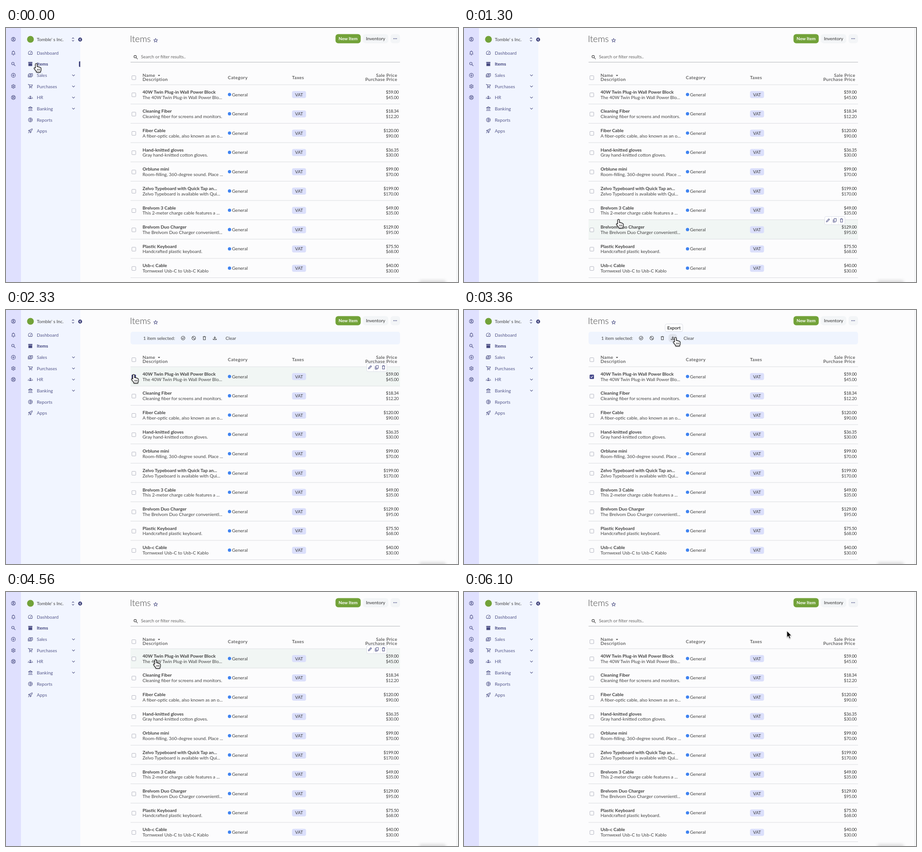
Write an HTML page that moves like this. It is 998x561 px and loops after 6.2 s.

```html
<!DOCTYPE html>
<html lang="en">
<head>
<meta charset="utf-8">
<title>Items</title>
<style>
html, body { margin: 0; width: 100%; height: 100%; overflow: hidden; background: #fcfcfd; }
svg { display: block; width: 998px; height: 561px; }
text { font: 400 10.1px Lato, sans-serif; fill: #424242; }
.b { font-weight: 700; }
.m { font-weight: 500; }
.h { letter-spacing: .4px; font-weight: 500; }
.nav { fill: #55588b; }
.price { font-size: 9.6px; letter-spacing: -.3px; text-anchor: end; }
.mid { text-anchor: middle; }
.icon { fill: none; stroke: #55588b; stroke-width: 1.1; stroke-linecap: round; stroke-linejoin: round; }
.dark { stroke: #424242; }
.box { fill: #fff; stroke: #dcdfe8; }
.cursor { filter: drop-shadow(0 1px 1px rgba(0, 0, 0, .35)); }
</style>
</head>
<body>
<svg id="stage" viewBox="0 0 998 561"></svg>
<script>
const LOOP = 6200;
const HOVER_LAG = 45;
const ROW_TOP = 125.3, ROW_H = 42.62;
const stage = document.getElementById('stage');

function add(tag, attrs, parent = stage) {
  const node = document.createElementNS('http://www.w3.org/2000/svg', tag);
  for (const key in attrs) node.setAttribute(key, attrs[key]);
  return parent.appendChild(node);
}
const rect = (x, y, width, height, fill, rx = 0, parent) =>
  add('rect', { x, y, width, height, fill, rx }, parent);
const circle = (cx, cy, r, fill, parent) => add('circle', { cx, cy, r, fill }, parent);
const group = (parent, cls = '') => add('g', { class: cls }, parent);
function text(str, x, y, cls = '', parent) {
  const node = add('text', { x, y, class: cls }, parent);
  node.textContent = str;
  return node;
}
const icon = (name, x, y, parent, cls = '') =>
  add('path', { d: ICONS[name] || name, transform: `translate(${x} ${y})`, class: 'icon ' + cls }, parent);
const show = (node, on) => node.setAttribute('visibility', on ? 'visible' : 'hidden');

const ring = r => `M${-r} 0a${r} ${r} 0 1 0 ${2 * r} 0a${r} ${r} 0 1 0 ${-2 * r} 0`;
const ICONS = {
  user: ring(4.4) + 'M-1.6-1.2a1.6 1.6 0 1 0 3.2 0a1.6 1.6 0 1 0-3.2 0M-3 3q3-2.4 6 0',
  bell: 'M-3.8 2.8H3.8M-2.8 2.8V-.8a2.8 2.8 0 0 1 5.6 0V2.8M0-4.6v.8M-.8 4.6h1.6',
  search: 'M-3.8-1a2.7 2.7 0 1 0 5.4 0a2.7 2.7 0 1 0-5.4 0M1 1L4 4',
  plus: ring(4.4) + 'M-2.2 0h4.4M0-2.2v4.4',
  gear: ring(3.5) + ring(1.3) + 'M0-3.5v-1.1M0 3.5v1.1M-3.1-1.8l-.9-.5M3.1 1.8l.9.5M-3.1 1.8l-.9.5M3.1-1.8l.9-.5',
  help: ring(4.4) + ring(1.7) + 'M-3.1-3.1l1.9 1.9M3.1-3.1l-1.9 1.9M-3.1 3.1l1.9-1.9M3.1 3.1l-1.9-1.9',
  dash: 'M-3.4 3.4a4.5 4.5 0 1 1 6.8 0zM0 1l2-2.8',
  items: 'M-4.2-4.2h8.4v2h-8.4zM-3.8-1h7.6v5.2h-7.6z',
  sales: 'M-3-3.6h7.8v5.4H-3zM-4.8-1.8v5.4h7.6M-.3-.9a1.2 1.2 0 1 0 2.4 0a1.2 1.2 0 1 0-2.4 0',
  cart: 'M-4.8-4.4h1.6l2 4.8h4l2-3.6h-7M-1.2.4l-1.2 1.8h6M-2 4.2h.2M3 4.2h.2',
  people: 'M-1.3-1.8a1.3 1.3 0 1 0 2.6 0a1.3 1.3 0 1 0-2.6 0M-2.6 2.4q2.6-2.6 5.2 0zM-4.2-.8h.2M4-.8h.2M-5 2.2q.3-1.4 1.4-1.4M5 2.2q-.3-1.4-1.4-1.4',
  bank: 'M-4.4-1.6L0-4.2l4.4 2.6zM-2.8 0v2.6M0 0v2.6M2.8 0v2.6M-4.4 4.3h8.8',
  chart: ring(4.3) + ring(1.5) + 'M0-4.3v2.8M0 1.5v2.8M1.5 0h2.8',
  rocket: 'M-2 .4Q0-4 4.4-4.4Q4 0-.4 2zM-2 .4l-2.4-.3l2-2.2M-.4 2l.3 2.4l2.2-2M-4.4 4.4l1.8-1.8M1-1.2h.3',
  chevron: 'M-2.6-1.2L0 1.3L2.6-1.2',
  left: 'M.8-1.6L-.9 0L.8 1.6',
  tick: 'M-2.3.1l1.6 1.7l3-3.4',
  sort: 'M-1.9-1.9L0-3.8L1.9-1.9M-1.9 1.9L0 3.8L1.9 1.9',
  star: 'M0-4.3L1.2-1.4L4.3-1.2L1.9.8L2.7 3.8L0 2.1L-2.7 3.8L-1.9.8L-4.3-1.2L-1.2-1.4z',
  enable: ring(4) + 'M-1.8 0l1.3 1.4l2.4-2.5',
  disable: ring(4) + 'M-2.8-2.8l5.6 5.6',
  trash: 'M-3-3h6M-1-3.8h2M-2.3-3v6.8h4.6V-3',
  export: 'M0-3.6V1M-1.9-.8L0 1.1L1.9-.8M-3.6 1.8v1.6h7.2V1.8',
  pencil: 'M-3.4 3.4l.4-2L2-3.6l1.6 1.6l-5 5z',
  copy: 'M-1.4-3.8h5v5.8h-5zM-3.4-2v6h5'
};

// Page frame and side panels
rect(0, 0, 998, 561, '#fcfcfd');
rect(0, 0, 33, 561, '#dfe0fe');
rect(33, 0, 131, 561, '#f1f5ff');
rect(995, 0, 1, 561, '#e6e7ea');
rect(913, 557, 58, 12, 'rgba(0, 0, 0, .12)', 4).style.filter = 'blur(3px)';

[['user', 25], ['bell', 55], ['search', 79.5], ['plus', 104.5], ['gear', 129], ['help', 153.5]]
  .forEach(([name, y]) => icon(name, 16.3, y));

circle(54, 25, 7.5, '#72a239');
text("Tomble' s Inc.", 68, 28.8);
icon('sort', 148, 25.3);
circle(163.7, 25.5, 4.4, '#45487f');
icon('left', 163.7, 25.5).style.stroke = '#fff';

[['dash', 'Dashboard', 55], ['items', 'Items', 79.5], ['sales', 'Sales', 104.5, 1],
 ['cart', 'Purchases', 129, 1], ['people', 'HR', 153.5, 1], ['bank', 'Banking', 178, 1],
 ['chart', 'Reports', 203], ['rocket', 'Apps', 227.2]].forEach(([name, label, y, more]) => {
  const mark = icon(name, 53.8, y);
  const caption = text(label, 68, y + 3.8, 'nav');
  if (more) icon('chevron', 149, y);
  if (label === 'Items') {
    mark.style.fill = '#45487f';
    mark.style.strokeWidth = .6;
    caption.style.cssText = 'fill:#3d407a;font-weight:700';
  }
});
const navMark = add('path', { d: 'M164 73.5h-1.2q-1.8 0-1.8 2v8.5q0 2 1.8 2h1.2z', fill: '#45487f' });

// Title and buttons
text('Items', 273.5, 31).style.cssText = 'font-size:19.8px;font-weight:300';
icon('star', 330.4, 27.3);
rect(727.5, 13.5, 55.7, 20.3, '#72a239', 6);
text('New Item', 755.3, 27.2, 'b mid').style.cssText = 'fill:#fff;font-size:9.7px';
rect(788, 13.5, 56, 20.3, '#f3f5f7', 6);
text('Inventory', 816, 27.2, 'm mid');
rect(849, 13.5, 21, 20.3, '#f3f5f7', 6);
[-3, 0, 3].forEach(d => circle(859.2 + d, 23.5, 1, '#55588b'));

// Search line and the bar that replaces it
const search = group();
icon('search', 286.3, 64.3, search, 'dark');
text('Search or filter results..', 298, 67.3, '', search).style.cssText = 'fill:#666;font-size:9.9px';
rect(275, 75, 595, 1, '#b4b6bb', 0, search);

const bar = group();
rect(275, 48, 595, 28, '#eff4fe', 5, bar);
const barHover = rect(452, 53, 19, 18, '#dfe3ec', 6, bar);
text('1 item selected:', 303, 65.8, '', bar);
text('Clear', 484.8, 65.8, '', bar);
const BAR = [['enable', 'Enable', 391], ['disable', 'Disable', 414.5], ['trash', 'Delete', 438], ['export', 'Export', 461]];
BAR.forEach(([name, , x]) => icon(name, x, 62, bar, 'dark'));

// Table
function checkbox(y) {
  return add('rect', { x: 278, y: y - 4.2, width: 8.5, height: 8.5, rx: 1, fill: '#fff', stroke: '#a9abb8', 'stroke-width': .9 });
}
checkbox(109.7);
text('Name', 301.5, 107.8, 'h');
add('path', { d: 'M335.3 103.8h5l-2.5 2.8z', fill: '#424242' });
text('Description', 301.5, 117, 'h');
text('Category', 489.8, 112.6, 'h');
text('Taxes', 631.6, 112.6, 'h');
text('Sale Price', 864, 107.8, 'h').style.textAnchor = 'end';
text('Purchase Price', 864, 117, 'h').style.textAnchor = 'end';
rect(275, 124.8, 595, 1, '#dadce0');

const ITEMS = [
  ['40W Twin Plug-in Wall Power Block', 'The 40W Twin Plug-in Wall Power Blo...', '59.00', '45.00'],
  ['Cleaning Fiber', 'Cleaning fiber for screens and monitors.', '18.34', '12.20'],
  ['Fiber Cable', 'A fiber-optic cable, also known as an o...', '120.00', '90.00'],
  ['Hand-knitted gloves', 'Gray hand-knitted cotton gloves.', '36.35', '30.00'],
  ['Orblune mini', 'Room-filling, 360-degree sound. Place ...', '99.00', '70.00'],
  ['Zelvo Typeboard with Quick Tap an...', 'Zelvo Typeboard is available with Qui...', '199.00', '170.00'],
  ['Brelvom 3 Cable', 'This 2-meter charge cable features a ...', '49.00', '35.00'],
  ['Brelvom Duo Charger', 'The Brelvom Duo Charger convenientl...', '129.00', '95.00'],
  ['Plastic Keyboard', 'Handcrafted plastic keyboard.', '75.50', '68.00'],
  ['Usb-c Cable', 'Tornwexel Usb-C to Usb-C Kablo', '40.00', '30.00']
];
const rows = ITEMS.map(([name, info, sale, cost], i) => {
  const y = ROW_TOP + i * ROW_H;
  const back = rect(275, y + .5, 595, ROW_H - 1, 'none');
  checkbox(y + 22.2);
  text(name, 301.5, y + 19.5, 'b');
  text(info, 301.5, y + 31.2);
  circle(493.5, y + 21.5, 3.6, '#3f83f1');
  text('General', 499, y + 25.2);
  rect(631.5, y + 14, 31, 15.5, '#dbdffb', 4);
  text('VAT', 647, y + 25.2, 'mid').style.fontSize = '9.6px';
  text('$' + sale, 867, y + 19.5, 'price m');
  text('$' + cost, 867, y + 31.2, 'price');
  rect(275, y + ROW_H - .5, 595, 1, '#dadce0');
  return back;
});

const checked = group();
rect(277.5, 142.8, 9.5, 9.5, '#45488a', 1.5, checked);
icon('tick', 282.2, 147.5, checked).style.stroke = '#fff';

const ACTIONS = [['pencil', 'Edit', 803.5], ['copy', 'Duplicate', 818.5], ['trash', 'Delete', 833.5]];
const actions = group();
add('rect', { x: 796.5, y: -7.3, width: 44.5, height: 18, rx: 3, class: 'box' }, actions);
[811.3, 826].forEach(x => rect(x, -7, .8, 17.5, '#e6e8ef', 0, actions));
ACTIONS.forEach(([name, , x]) => icon(name, x, 1.3, actions));

const tooltip = group();
const tipBox = add('rect', { y: -8.5, height: 17, rx: 4, class: 'box' }, tooltip);
const tipText = text('', 0, 3.7, 'mid m', tooltip);
tipText.style.fill = '#111';
const TIP_W = { Edit: 28, Duplicate: 57, Delete: 38, Export: 39, Enable: 40, Disable: 43 };

// Pointer shapes
const cursor = group(stage, 'cursor');
const hand = group(cursor);
add('path', {
  d: 'M-2 9.5V1.3a1.9 1.9 0 0 1 3.8 0V6.6q2.2-1 3.3.8q2-.8 3 .9q2.3-.3 2.3 2V13.5q0 1.8-1.2 3.3V18.5H.2V17C-1.6 14.5-3.4 12.8-4.7 10.6c-.7-1.8 1-2.7 2.7-1.1z',
  fill: '#fff', stroke: '#222', 'stroke-width': 1.3, 'stroke-linejoin': 'round'
}, hand);
add('path', { d: 'M2.3 11v4M4.8 11v4M7.3 11v4', fill: 'none', stroke: '#222', 'stroke-width': 1 }, hand);
const arrow = add('path', {
  d: 'M0 0V14.3L3.2 11.3L5.5 16.7L7.9 15.7L5.7 10.4H10z',
  fill: '#000', stroke: '#fff', 'stroke-width': .9
}, cursor);

// Pointer path: time, x, y; equal neighbours are rests
const PATH = [
  [0, 67, 79], [200, 67, 79], [500, 170, 215], [800, 302, 373], [1060, 296, 505],
  [1300, 341, 424], [1430, 410, 247], [1700, 440, 141], [1930, 440, 141],
  [2240, 282, 143], [2560, 282, 143], [2860, 350, 108], [3160, 436, 62],
  [3360, 467, 61], [3560, 467, 61], [4000, 324, 118], [4160, 288, 146],
  [4300, 282, 149], [4460, 282, 149], [4760, 540, 150], [5060, 803, 127],
  [5100, 803, 127], [5280, 819, 127], [5500, 835, 127], [5730, 835, 127],
  [6100, 713, 86], [LOOP, 713, 86]
];
const same = (a, b) => a[1] === b[1] && a[2] === b[2];
function slope(i, axis) {
  const a = PATH[i - 1], p = PATH[i], b = PATH[i + 1];
  if (!a || !b || same(a, p) || same(p, b)) return 0;
  return (b[axis] - a[axis]) / (b[0] - a[0]);
}
function pointerAt(t) {
  const i = PATH.findIndex(p => p[0] > t) - 1;
  const a = PATH[i], b = PATH[i + 1], span = b[0] - a[0];
  const u = (t - a[0]) / span, v = 1 - u;
  return [1, 2].map(k =>
    v * v * (1 + 2 * u) * a[k] + u * u * (3 - 2 * u) * b[k] +
    span * u * v * (v * slope(i, k) - u * slope(i + 1, k)));
}

function draw(t) {
  const [x, y] = pointerAt(t);
  cursor.setAttribute('transform', `translate(${x} ${y})`);

  // The page reacts slightly behind the pointer
  const [hx, hy] = pointerAt(Math.max(0, t - HOVER_LAG));
  const inside = (l, top, r, bottom) => hx >= l && hx <= r && hy >= top && hy <= bottom;
  const selected = t >= 2290 && t < 4220;

  show(search, !selected);
  show(bar, selected);
  show(checked, selected);

  const onNav = inside(48, 70, 160, 90);
  show(navMark, onNav);

  const row = inside(275, ROW_TOP, 870, 551) ? Math.floor((hy - ROW_TOP) / ROW_H) : -1;
  const rowY = ROW_TOP + row * ROW_H;
  rows.forEach((back, i) => back.setAttribute('fill', i === row ? '#f1f6f4' : 'none'));
  show(actions, row >= 0);
  actions.setAttribute('transform', `translate(0 ${rowY})`);

  const tool = selected && BAR.find(b => inside(b[2] - 9.5, 53, b[2] + 9.5, 71));
  show(barHover, tool);
  if (tool) barHover.setAttribute('x', tool[2] - 9.5);

  const action = row >= 0 && ACTIONS.find(a => inside(a[2] - 7.5, rowY - 7, a[2] + 7.4, rowY + 10));
  const tip = tool || action;
  show(tooltip, tip);
  if (tip) {
    const label = tip[1], w = TIP_W[label];
    const cx = tip[2] + (action && label === 'Delete' ? 8.5 : 2.5);
    tooltip.setAttribute('transform', `translate(${cx} ${tool ? 39.3 : rowY - 21.5})`);
    tipBox.setAttribute('x', -w / 2);
    tipBox.setAttribute('width', w);
    tipText.textContent = label;
  }

  const pointing = row >= 0 || tool || onNav ||
    inside(301, 100, 356, 126) || inside(793, 100, 864, 126);
  show(hand, pointing);
  show(arrow, !pointing);
}

const start = performance.now();
function tick() {
  draw((performance.now() - start) % LOOP);
  requestAnimationFrame(tick);
}
tick();
</script>
</body>
</html>
```
